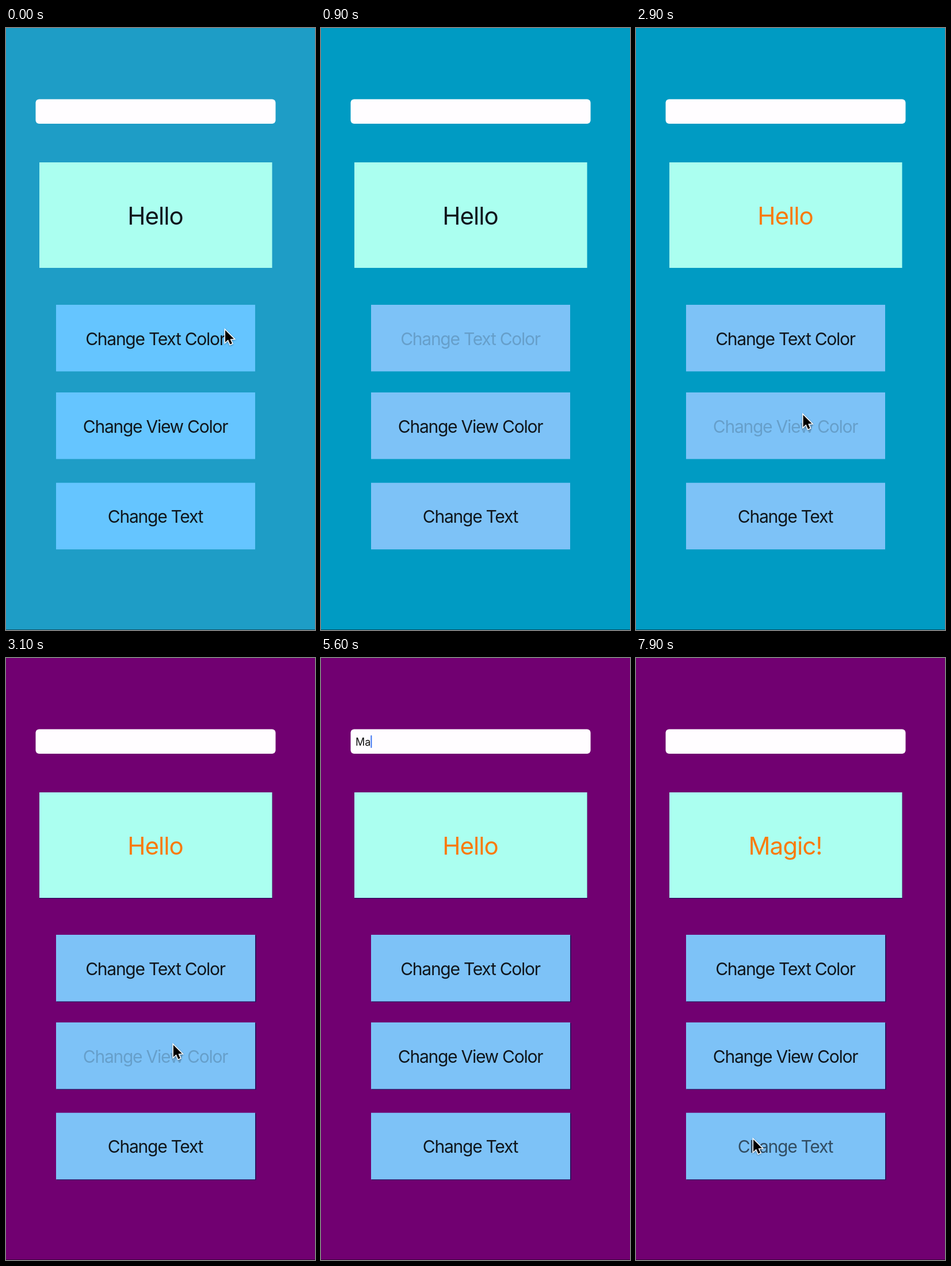
An HTML page for the animation above (8 s loop, 537 by 1044 pixels).

```html
<!DOCTYPE html>
<html lang="en">
<head>
<meta charset="utf-8">
<title>Change colors and text</title>
<style>
  html, body { margin: 0; width: 100%; height: 100%; overflow: hidden; background: #1e9dc6; }
  svg { display: block; width: 537px; height: 1044px; }
  text { font-family: Inter, Roboto, sans-serif; font-optical-sizing: none; fill: #10161c; }
  .label { font-size: 30px; letter-spacing: -.042em; text-anchor: middle; }
  #title { font-size: 42px; letter-spacing: -.022em; text-anchor: middle; }
  #entry { font-size: 18px; fill: #111; white-space: pre; }
  #edges { fill: #26105c; }
  #arrow { filter: drop-shadow(0 1.5px 1.5px rgba(0, 0, 0, .35)); }
</style>
</head>
<body>
<svg viewBox="0 0 537 1044">
  <rect id="bg" width="537" height="1044"/>
  <rect y="1043" width="537" height="1" fill="#000" opacity=".5"/>
  <g id="edges"></g>
  <rect x="51.5" y="123.5" width="417" height="42.5" rx="6" fill="#fffdff"/>
  <text id="entry" x="60" y="152"></text>
  <rect id="caret" y="134" width="2" height="22" rx="1" fill="#3b74f0"/>
  <rect x="58" y="233" width="404.5" height="183" fill="#abfff0"/>
  <text id="title" x="259.5" y="341"></text>
  <g id="buttons"></g>
  <g id="arrow">
    <path d="M2 4V25L7 20.5L10.5 28.5L14 27L10.5 19.5L17 19Z" fill="#000" stroke="#fff"
      stroke-width="3" stroke-linejoin="miter" paint-order="stroke"/>
  </g>
  <g id="ibeam" fill="none" stroke-linecap="round">
    <path id="beam" d="M-5 -12Q0 -12 0 -8Q0 -12 5 -12M0 -8V8M-5 12Q0 12 0 8Q0 12 5 12M-3 1H3"
      stroke="#101010" stroke-width="2"/>
  </g>
</svg>
<script>
const LOOP = 8000, STEP = 100;
const $ = id => document.getElementById(id);

function add(parent, tag, attrs, text = '') {
  const el = document.createElementNS('http://www.w3.org/2000/svg', tag);
  for (const k in attrs) el.setAttribute(k, attrs[k]);
  el.textContent = text;
  return parent.appendChild(el);
}

// press: touch down, release: fade-in of the label begins
const buttons = [
  { label: 'Change Text Color', y: 480, press: 900, release: 900 },
  { label: 'Change View Color', y: 632, press: 2900, release: 3100 },
  { label: 'Change Text', y: 788.7, press: 7600, release: 7750 }
];
for (const b of buttons) {
  add($('edges'), 'rect', { x: 88, y: b.y + 1, width: 346.7, height: 115.7 });
  b.face = add($('buttons'), 'rect', { x: 87, y: b.y, width: 346, height: 115.5 });
  b.text = add($('buttons'), 'text', { class: 'label', x: 259.5, y: b.y + 69.7 }, b.label);
}
add($('edges'), 'rect', { x: 58, y: 234, width: 405, height: 183.3 });

const pointer = [
  [0, 379, 520], [300, 305, 536], [1100, 305, 536], [1400, 285, 550], [1800, 277, 579],
  [2500, 288, 667], [3300, 289, 667], [4100, 273, 149], [5000, 273, 149],
  [6300, 273, 149], [6700, 177, 614], [7300, 202, 831], [8000, 202, 831]
];
const hidden = [[900, 1100], [5100, 6400]];
const typed = [5200, 5500, 5700, 5800, 6000, 6200];
const WORD = 'Magic!';

const within = (t, [a, b]) => t >= a && t < b;

function pointerAt(t) {
  const i = pointer.findIndex(p => p[0] > t);
  const [t0, x0, y0] = pointer[i - 1], [t1, x1, y1] = pointer[i];
  const k = (t - t0) / (t1 - t0), e = k * k * (3 - 2 * k);
  return [x0 + (x1 - x0) * e, y0 + (y1 - y0) * e];
}

function labelOpacity(b, t) {
  if (t < b.press) return 1;
  return Math.min(1, .2 + .8 * Math.max(0, t - b.release) / 250);
}

const show = (id, on) => { $(id).style.display = on ? '' : 'none'; };

function draw(t) {
  const purple = t >= 3000, early = t < 900, swapped = t >= 7800;

  $('bg').setAttribute('fill', purple ? '#710071' : early ? '#1e9dc6' : '#009bc3');
  show('edges', purple);
  for (const b of buttons) {
    b.face.setAttribute('fill', early ? '#65c5ff' : '#7dc2f7');
    b.text.style.opacity = labelOpacity(b, t);
  }

  $('title').textContent = swapped ? WORD : 'Hello';
  $('title').style.fill = t >= 1000 ? '#f97a0c' : '#10161c';

  $('entry').textContent = swapped ? '' : WORD.slice(0, typed.filter(k => k <= t).length);
  const typing = within(t, [5100, 6400]);
  show('caret', within(t, [4600, 6500]) && (typing || (t - 4600) % 1000 < 500));
  $('caret').setAttribute('x', 60 + $('entry').getComputedTextLength());

  const [x, y] = pointerAt(t);
  const visible = !hidden.some(h => within(t, h));
  const inField = y > 123 && y < 166;
  show('arrow', visible && !inField);
  show('ibeam', visible && inField);
  for (const id of ['arrow', 'ibeam']) $(id).setAttribute('transform', `translate(${x} ${y})`);
}

const start = performance.now();
function tick() {
  const t = (performance.now() - start) % LOOP;
  draw(Math.floor(t / STEP) * STEP);
  requestAnimationFrame(tick);
}
tick();
</script>
</body>
</html>
```
